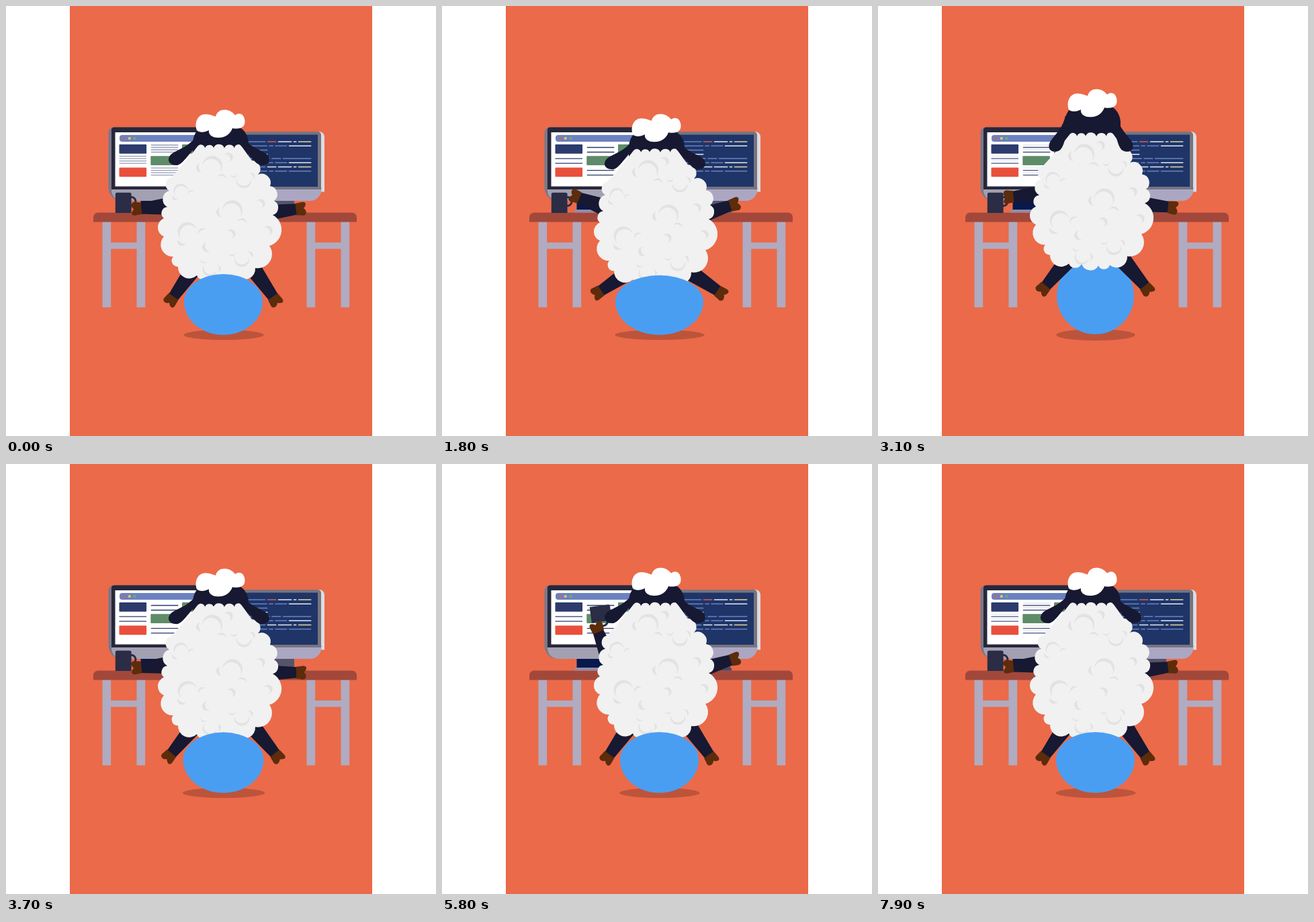
An HTML page with a canvas that plays this animation: 640 px wide and 640 px high, repeating every 8000 ms.

```html
<!DOCTYPE html>
<html lang="en">
<head>
<meta charset="utf-8">
<title>Sheep at work</title>
<style>
html, body { margin: 0; width: 100%; height: 100%; overflow: hidden; background: #fff; }
canvas { display: block; width: 640px; height: 640px; }
</style>
</head>
<body>
<canvas id="stage" width="640" height="640"></canvas>
<script>
const ctx = document.getElementById('stage').getContext('2d');
const LOOP = 8000;
const DARK = '#171831', HOOF = '#5c2c0c', NAVY = '#2c3b6c', LILAC = '#b0abc0', MUG = '#2a2d45';
const BLUE = '#6a82bf', WHITE = '#e6e8f2', YELLOW = '#e6d79a', RED = '#e25a50';

const clamp = (v, a = 0, b = 1) => Math.min(b, Math.max(a, v));
const mix = (a, b, u) => a + (b - a) * u;
const span = (t, a, b) => clamp((t - a) / (b - a));
const smooth = u => u * u * (3 - 2 * u);
const rad = d => d * Math.PI / 180;

function rect(color, x, y, x2, y2, r = 0) {
  ctx.fillStyle = color;
  ctx.beginPath();
  ctx.roundRect(x, y, x2 - x, y2 - y, r);
  ctx.fill();
}

function oval(color, x, y, rx, ry) {
  ctx.fillStyle = color;
  ctx.beginPath();
  ctx.ellipse(x, y, rx, ry, 0, 0, 7);
  ctx.fill();
}

function shape(color, path) {
  ctx.fillStyle = color;
  ctx.fill(path);
}

function at(x, y, turn, draw) {
  ctx.save();
  ctx.translate(x, y);
  ctx.rotate(turn);
  draw();
  ctx.restore();
}

// lobes bulge between neighbouring notches, in proportion to their distance
function lobes(notches) {
  let d = '', px, py;
  for (const pair of notches.split(' ')) {
    const [x, y] = pair.split(',').map(Number);
    const r = 0.54 * Math.hypot(x - px, y - py);
    d += d ? ` A${r} ${r} 0 0 1 ${x} ${y}` : `M${x} ${y}`;
    px = x;
    py = y;
  }
  return d;
}

const crown = '285,209 296,211.5 309,211 325,211.5 340,211.5 350,208';
const flanks = '366,230 375,251 393,268 399,290 397,311 392,357 371,390 345,403 328,404 303,401 ' +
  '284,401 256,388 249,373 235,343 235,316 240,299 243,275 246,255';
const wool = new Path2D(lobes(crown) + lobes(flanks).replace('M', ' L') + ' Q266 234 285 209 Z');
const tuft = new Path2D(`M284 185 C280 174 285 161 297 161 C304 161 309 164 312 164.5
  C314 157 320 154 326 154.5 C334 155 338 159 341 162.5 C349 157 355 163 355.5 171
  C356 180 350 184 337 182 C334 190 327 196 316 196 C306 196 301 191 302 185
  C296 188 288 189 284 185 Z`);
const head = new Path2D('M278 235 V204 C279 184 292 174 320 174 C347 174 360 186 361 204 V235 Z');
const ear = new Path2D(`M284 193 C274 208 258 213 248 219 C238 226 241 237 254 237
  C262 237 272 220 285 207 Z`);
const hoof = new Path2D('M0 -8.5 L11 -9.5 Q16 -9 15 -5 Q14 -2 11.5 0 Q15 3 14.5 7 Q13 12 7 10 L0 9 Z');

// crescent: an arc that swells to thickness w
function crescent(x, y, r, a, b, w) {
  const n = 20;
  ctx.beginPath();
  for (let i = 0; i <= 2 * n; i++) {
    const u = i <= n ? i / n : 2 - i / n;
    const q = i <= n ? r : r - w * Math.sin(Math.PI * u);
    const k = rad(mix(a, b, u));
    ctx.lineTo(x + q * Math.cos(k), y + q * Math.sin(k));
  }
  ctx.fill();
}

function swirl(x, y, size, turn) {
  at(x, y, rad(turn), () => {
    ctx.scale(size, size);
    crescent(0, 0, 15, 180, 400, 5);
    crescent(-17, 3, 7, 80, 260, 4.5);
    crescent(14, 19, 7, 200, 370, 3);
  });
}

function fleece() {
  shape('#f1f1f1', wool);
  ctx.fillStyle = '#e2e2e2';
  swirl(307, 238, 1, 0);
  swirl(337, 304, 1, 0);
  swirl(354, 260, 0.75, 160);
  swirl(351, 377, 0.75, 160);
  swirl(260, 275, 0.7, -40);
  swirl(270, 336, 0.95, -50);
  swirl(303, 392, 0.7, 185);
  for (const [x, y] of [[331, 225], [379, 294], [335, 339], [390, 334]]) crescent(x, y, 6.7, 210, 440, 5);
  crescent(299, 359, 7, 50, 270, 5);
}

function limb(x, y, fx, fy, w) {
  const len = Math.hypot(fx - x, fy - y);
  at(x, y, Math.atan2(fy - y, fx - x), () => {
    ctx.fillStyle = DARK;
    ctx.beginPath();
    ctx.moveTo(0, -w);
    ctx.lineTo(len - 6, -8);
    ctx.lineTo(len - 6, 8);
    ctx.lineTo(0, w);
    ctx.fill();
    ctx.translate(len - 8, 0);
    shape(HOOF, hoof);
  });
}

function desk() {
  for (const x of [143.5, 447.5]) {
    rect(LILAC, x, 320, x + 12.7, 448.5);
    rect(LILAC, x + 51, 320, x + 63.7, 448.5);
    rect(LILAC, x + 12, 352, x + 52, 361.5);
  }
  rect('#a2483b', 130, 307.5, 522, 321.5, [7, 7, 0, 0]);
}

// two alternating pairs of lines that fade into each other
function textRows(x, y, alpha) {
  for (let i = 0; i < 4; i++) {
    ctx.globalAlpha = i % 2 ? 1 - alpha : alpha;
    rect(NAVY, x, y + i * 3.5 - 0.65, x + 40.5, y + i * 3.5 + 0.65);
  }
  ctx.globalAlpha = 1;
}

function leftScreen(t) {
  rect('#08194c', 200.5, 288, 240, 303);
  rect('#8f8da8', 197, 303, 244, 307.5, [3, 0, 0, 0]);
  rect('#7b778a', 152.5, 180.5, 300, 290, [8, 0, 0, 20]);
  rect('#a3a0b2', 157, 270, 300, 290, [0, 0, 0, 16]);
  rect('#26273a', 157, 180.5, 300, 273, [4, 0, 0, 0]);
  rect('#fff', 162.5, 188, 300, 268.5);
  rect('#6c82c0', 169, 192, 300, 202, [4, 0, 0, 4]);
  [RED, '#efc65a', '#6cb06c'].forEach((c, i) => oval(c, 176 + i * 7.75, 197, 2.1, 2.1));
  const card = (c, x, y) => rect(c, x, y, x + 40.6, y + 13.8, 1);
  card(NAVY, 168.5, 206);
  card('#e94f3d', 168.5, 240.5);
  card('#5f8c68', 215.3, 223.2);
  card('#5f8c68', 262, 206);
  const a = clamp(0.5 + 1.2 * Math.sin(2 * Math.PI * t / 2000));
  textRows(168.5, 223.7, a);
  textRows(215.8, 207, a);
  textRows(215.8, 241.2, a);
}

// each row is one line, cut at tab stops; the word colours follow the row
function codeRow(i) {
  const y = 202 + i * 6.25;
  const long = i % 6 === 0;
  const end = i === 2 || i === 3 ? 389.5 : 454.5;
  const stops = long ? [387.5, 403.5, 426.5, 433.5] : i === 4 ? [394, 410.5] : [390, 399, 419.5];
  const edges = [359, ...stops.filter(s => s < end), end + 1];
  for (let k = 1; k < edges.length; k++) {
    const last = k === edges.length - 1;
    let c = BLUE;
    if (long) c = last ? YELLOW : k === 2 && !i ? RED : k > 1 ? WHITE : BLUE;
    else if (last && (i === 1 || i === 3 || i === 5)) c = WHITE;
    rect(c, edges[k - 1] + 1.2, y - 0.85, edges[k] - 1, y + 0.85, 0.8);
  }
}

function rightScreen() {
  rect('#55546a', 390, 288, 429, 303);
  rect('#4b4a60', 385, 302.5, 431, 307.5, [0, 3, 0, 0]);
  rect('#dcdce2', 340, 187, 474, 276.5, [0, 8, 0, 0]);
  rect('#aba7c3', 340, 270, 469.5, 290, [0, 0, 17, 0]);
  rect('#77757f', 340, 187, 469, 273, [0, 5, 0, 0]);
  rect('#1f3568', 340, 191.5, 464, 269);
  for (let i = 0; i < 8; i++) codeRow(i);
}

function mug() {
  ctx.strokeStyle = MUG;
  ctx.lineWidth = 3;
  ctx.beginPath();
  ctx.ellipse(187, 291, 6, 6.5, 0, 0, 7);
  ctx.stroke();
  rect(MUG, 162.8, 277.7, 186.6, 308, [2.5, 2.5, 0, 0]);
}

function ball(dy, q) {
  const rx = dy > 0 ? 58.5 + 1.1 * dy : 58.5 - 1.1 * q;
  const top = dy > 0 ? 399 + 0.27 * dy : 399 - 25 * q;
  const mid = 440 - 8.5 * q, bottom = 489.5 - q;
  ctx.fillStyle = '#4a9ef2';
  ctx.beginPath();
  ctx.ellipse(323.5, mid, rx, mid - top, 0, Math.PI, 2 * Math.PI);
  ctx.ellipse(323.5, mid, rx, bottom - mid, 0, 0, Math.PI);
  ctx.fill();
}

// vertical offset of the head: slow sink, spring up, drop, settle
function bounce(t) {
  if (t < 2400) return 7.5 * smooth(t / 2400);
  if (t < 3250) return 7.5 - 39.5 * (1 - (1 - span(t, 2400, 3250)) ** 2);
  if (t < 3600) return -32 * (1 - span(t, 3250, 3600) ** 2);
  const u = span(t, 3600, 4400);
  return 4 * Math.sin(Math.PI * u) * (1 - u);
}

function arms(t, dy) {
  const sip = smooth(span(t, 4600, 5600)) - smooth(span(t, 6300, 7250));
  const tilt = sip * (72 + 6 * smooth(span(t, 5700, 6200)));
  const tap = 32 * Math.sin(Math.PI * span(t, 1100, 3100)) ** 2;
  const turn = rad(-5 + tilt + tap);
  const x = 252, y = 297 + dy;
  const hx = x - 58.5 * Math.cos(turn), hy = y - 58.5 * Math.sin(turn);
  if (sip > 0) at(hx, hy, rad(tilt * 1.13), () => {
    ctx.translate(-193.7, -302.1);
    mug();
  });
  else mug();
  limb(x, y, hx, hy, 14);

  const k = rad(-10.7 - 17 * Math.cos(2 * Math.PI * (t - 1120) / 3950));
  limb(372, 310 + dy, 372 + 68 * Math.cos(k), 310 + dy + 68 * Math.sin(k), 13);
}

function legs(dy, q) {
  const p = Math.max(0, dy) / 7.5;
  const hipY = 384 + (dy > 0 ? 1.3 : 0.25) * dy;
  const reach = 78.5 + 19 * p - 2 * p * p;
  const footY = 439 - 13 * p - 16.5 * q;
  for (const s of [-1, 1]) limb(323.5 + s * 39.5, hipY, 323.5 + s * reach, footY, 13);
}

function ears(dy, q) {
  for (const s of [1, -1]) {
    ctx.save();
    ctx.translate(s > 0 ? 0 : 634, dy);
    ctx.scale(s, 1);
    ctx.translate(283, 205);
    ctx.rotate(rad(-24 * q));
    ctx.translate(-283, -205);
    shape(DARK, ear);
    ctx.restore();
  }
}

function draw(t) {
  rect('#fff', 0, 0, 640, 640);
  rect('#eb6a49', 95, 0, 545, 640);
  const dy = bounce(t);
  const bodyY = dy > 0 ? dy : dy * 0.57;
  const q = clamp(-dy / 30);
  const lifted = dy < -3;

  desk();
  leftScreen(t);
  rightScreen();
  oval('#bc543b', 324, 489.5, 59.7 + (dy > 0 ? 1.1 * dy : -q), 7.5 + q);
  if (lifted) ball(dy, q);
  arms(t, bodyY);
  legs(dy, q);
  at(0, dy, 0, () => shape(DARK, head));
  at(0, bodyY, 0, fleece);
  ears(dy, q);
  at(0, dy, 0, () => shape('#fff', tuft));
  if (!lifted) ball(dy, q);
}

const start = performance.now();
function tick() {
  draw((performance.now() - start) % LOOP);
  requestAnimationFrame(tick);
}
tick();
</script>
</body>
</html>
```
